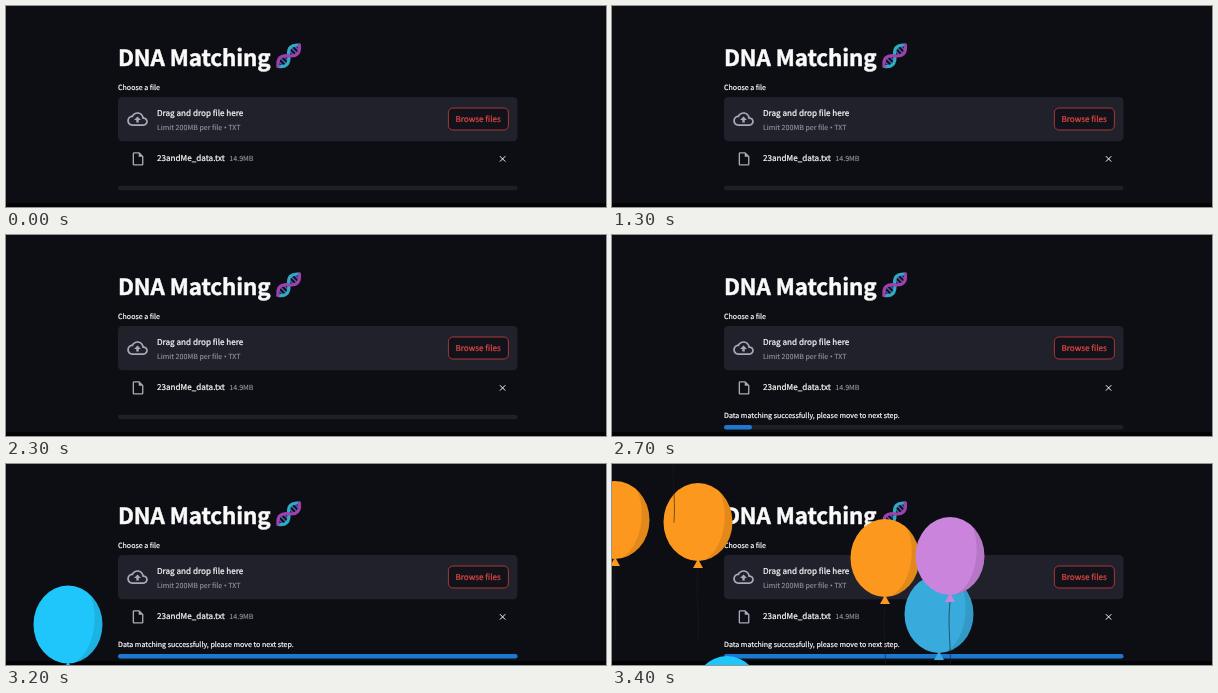
An HTML page that plays this animation: 600x201 px, repeating every 3500 ms.

```html
<!DOCTYPE html>
<html lang="en">
<head>
<meta charset="utf-8">
<title>DNA Matching</title>
<style>
  html, body { margin: 0; height: 100%; overflow: hidden; background: #0d0e13; }
  svg { display: block; width: 600px; height: 201px; }
  text {
    font: 7.1px "Noto Sans CJK JP", "Noto Sans CJK SC", "Noto Sans CJK", "Open Sans", sans-serif;
    text-rendering: geometricPrecision;
    color: #fafafa; fill: currentColor; stroke: currentColor; stroke-width: .2;
  }
  .title { font-size: 22.4px; font-weight: 700; letter-spacing: -.005em; stroke-width: .5; }
  .body { font-size: 8.15px; stroke-width: .24; }
  .muted { color: #92949b; stroke-width: .12; }
  .action { color: #e04643; }
  .bullet { font-family: "Noto Sans", sans-serif; }
  .icon { fill: #a6aab7; }
  .helix { fill: none; stroke-width: 3.2; stroke-linecap: round; }
</style>
</head>
<body>
<svg viewBox="0 0 600 201">
  <rect width="600" height="201" fill="#0d0e13"/>
  <rect y="197" width="600" height="4" fill="#040406"/>

  <text class="title" x="112" y="59.9">DNA Matching</text>
  <g class="helix" transform="translate(282.7 49.8) rotate(-45)">
    <path d="M-11-3V3M-7.5-4V4M-4-3V3M4-3V3M7.5-4V4M11-3V3" stroke="#4a5aa8" style="stroke-width:1.6"/>
    <path d="M-15 0C-10 6.5-5 6.5 0 0S10-6.5 15 0" stroke="#2fabc6"/>
    <path d="M-15 0C-10-6.5-5-6.5 0 0S10 6.5 15 0" stroke="#a03fae"/>
  </g>

  <text x="112" y="84">Choose a file</text>
  <rect x="112" y="91" width="399.5" height="44.3" rx="4.5" fill="#20212b"/>
  <path class="icon" transform="translate(121.2 102.7) scale(.86)" d="M19.35 10.04C18.67 6.59 15.64 4 12 4 9.11 4 6.6 5.64 5.35 8.04 2.34 8.36 0 10.91 0 14c0 3.31 2.69 6 6 6h13c2.76 0 5-2.24 5-5 0-2.64-2.05-4.78-4.65-4.96zM19 18H6c-2.21 0-4-1.79-4-4 0-2.05 1.53-3.76 3.56-3.97l1.07-.11.5-.95C8.08 7.14 9.94 6 12 6c2.62 0 4.88 1.86 5.39 4.43l.3 1.5 1.53.11c1.56.1 2.78 1.41 2.78 2.96 0 1.65-1.35 3-3 3zM8 13h2.55v3h2.9v-3H16l-4-4z"/>
  <text class="body" x="151" y="109.8">Drag and drop file here</text>
  <text class="muted" x="151" y="124.1">Limit 200MB per file <tspan class="bullet">•</tspan> TXT</text>
  <rect x="442.4" y="102" width="60" height="22" rx="4.5" fill="#12131a" stroke="#cf3f3d" stroke-width=".8"/>
  <text class="body action" x="449.4" y="115.8">Browse files</text>

  <path class="icon" transform="translate(124 144.8) scale(.67)" d="M14 2H6c-1.1 0-2 .9-2 2v16c0 1.1.9 2 2 2h12c1.1 0 2-.9 2-2V8zM6 20V4h7v5h5v11z"/>
  <text class="body" x="151" y="155.1">23andMe_data.txt</text>
  <text class="muted" x="223.3" y="155.1">14.9MB</text>
  <path d="M493.9 150.2l5.4 5.4m0-5.4l-5.4 5.4" stroke="#fafafa"/>

  <text id="status" x="112" y="183">Data matching successfully, please move to next step.</text>
  <g id="bar">
    <rect x="112" width="399.5" height="4.5" rx="2.2" fill="#1e1f27"/>
    <rect id="fill" x="112" height="4.5" rx="2.2" fill="#1c78d0"/>
  </g>
  <g id="balloons"></g>
</svg>
<script>
const $ = id => document.getElementById(id);
const LOOP = 3500, TICK = 100, DONE = 27, LAUNCH = 33;

// x, top edge at LAUNCH, rise per tick, colour; listed back to front
const balloons = [
  [115, 305, 113, '#1fc6fb'],
  [327, 224, 113, '#38abdc'],
  [273, 168, 113, '#fb981d'],
  [338, 166, 113, '#ca84dc'],
  [3, 135, 118, '#fb981d'],
  [86, 137, 118, '#fb981d'],
  [62, 10.5, 111, '#1fc6fb'],
];

$('balloons').innerHTML = balloons.map(([, , , color]) => `<g fill="${color}">
  <path d="M0 46C-3 70 2 95 0 120" fill="none" stroke="#1b1c20" stroke-width=".6"/>
  <path d="M0 37l-5 9h10z"/>
  <ellipse rx="34.5" ry="39"/>
  <path d="M22-30A34.5 39 0 0 1 4 39C24 32 33-6 22-30z" fill="#000" opacity=".1"/>
</g>`).join('');
const nodes = [...$('balloons').children];

function draw(now) {
  const tick = Math.floor(now % LOOP / TICK);
  const done = tick >= DONE;
  const progress = done ? Math.min(1, .07 + (tick - DONE) * .2325) : 0;
  $('status').setAttribute('visibility', done ? 'visible' : 'hidden');
  $('bar').setAttribute('transform', `translate(0 ${done ? 190 : 179.8})`);
  $('fill').setAttribute('width', 399.5 * progress);
  balloons.forEach(([x, top, rise], i) =>
    nodes[i].setAttribute('transform', `translate(${x} ${top + 39 + (LAUNCH - tick) * rise})`));
}

function loop() {
  draw(performance.now());
  requestAnimationFrame(loop);
}
loop();
</script>
</body>
</html>
```
